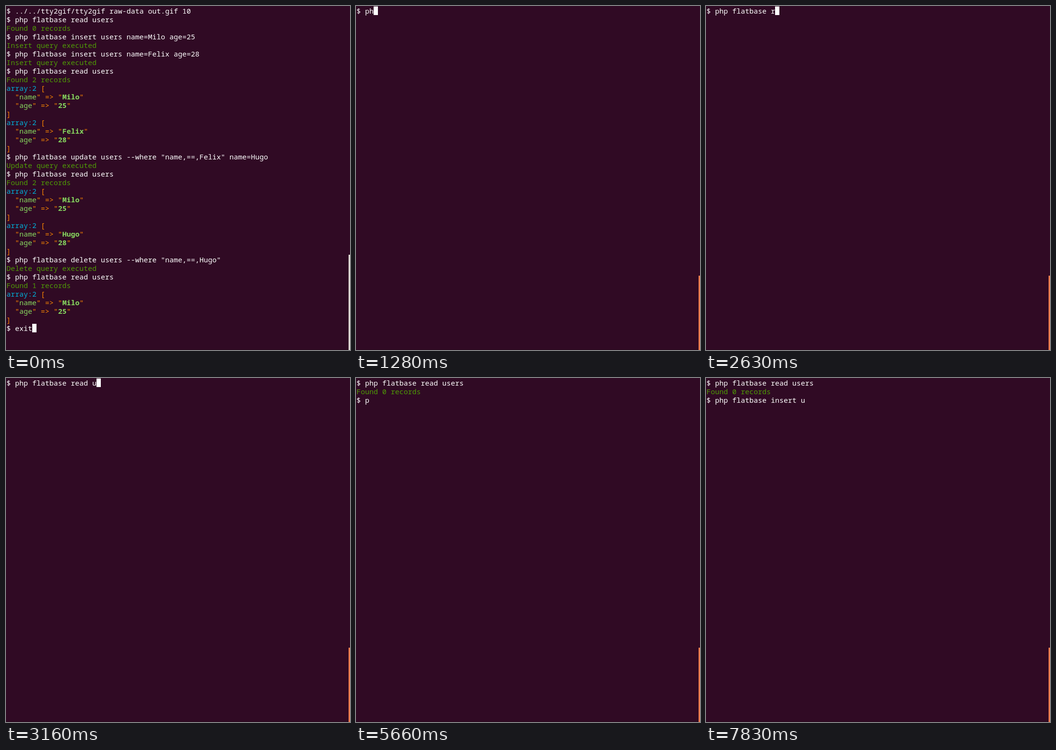
Write an HTML page that moves like this. It is 722 px wide and 722 px high and loops after 8 s.

```html
<!DOCTYPE html>
<html lang="en">
<head>
<meta charset="utf-8">
<title>Terminal session</title>
<style>
  html, body { margin: 0; width: 100%; height: 100%; overflow: hidden; background: #300a24; }
  #stage { position: relative; width: 722px; height: 722px; overflow: hidden; }
  #stage::after {
    content: ""; position: absolute; left: 0; bottom: 0; width: 722px; height: 1px; background: #280a1e;
  }
  #screen {
    position: absolute; left: 1px; top: 1px; margin: 0; color: #fff;
    font: 500 15px/18px "Noto Sans Mono", "Liberation Mono", monospace;
    font-variant-ligatures: none;
  }
  #cursor { position: absolute; width: 9px; height: 18px; background: #fff; }
  #scrollbar { position: absolute; left: 719px; width: 3px; bottom: 0; z-index: 1; }
  .ok { color: #4e9a06; }
  .type { color: #00afd7; }
  .mark { color: #ff8700; }
  .str { color: #87d75f; }
  b { font-weight: 700; }
</style>
</head>
<body>
<div id="stage">
  <pre id="screen"></pre>
  <div id="cursor"></div>
  <div id="scrollbar"></div>
</div>
<script>
const LOOP = 8000, CELL_W = 9, CELL_H = 18;
const CLEARED = 100, CURSOR_OFF = 3560, FOUND = 3900, PROMPT = 3970;
const [screenEl, cursorEl, barEl] = ["screen", "cursor", "scrollbar"].map(id => document.getElementById(id));

const span = (cls, text) => `<span class="${cls}">${text}</span>`;
const ok = text => span("ok", text);
const quoted = text => span("mark", '"') + span("str", text) + span("mark", '"');
const field = (key, value) => `  ${quoted(key)} ${span("mark", "=&gt;")} ${quoted(`<b>${value}</b>`)}`;
const record = (name, age) => [
  span("type", "array:2") + " " + span("mark", "["),
  field("name", name),
  field("age", age),
  span("mark", "]")
];

const run = command => "$ php flatbase " + command;
const found = count => ok(`Found ${count} records`);
const executed = query => ok(query + " query executed");
const read = (...records) => [run("read users"), found(records.length), ...records.flat()];

const adult = record("Milo", 25);
const history = [
  "$ ../../tty2gif/tty2gif raw-data out.gif 10",
  ...read(),
  run("insert users name=Milo age=25"), executed("Insert"),
  run("insert users name=Felix age=28"), executed("Insert"),
  ...read(adult, record("Felix", 28)),
  run('update users --where "name,==,Felix" name=Hugo'), executed("Update"),
  ...read(adult, record("Hugo", 28)),
  run('delete users --where "name,==,Hugo"'), executed("Delete"),
  ...read(adult),
  "$ exit"
];

// A burst of typing: chunks split by | appear one after another at a steady pace
const burst = (start, gap, keys) => t =>
  keys.split("|").filter((_, i) => t >= start + i * gap).join("");
const line = (...bursts) => t => "$ " + bursts.map(textAt => textAt(t)).join("");

const readLine = line(
  burst(1280, 230, "ph|p f|l"),
  burst(1855, 100, "a|t|b|a|s"),
  burst(2530, 90, "e |r|e|a"),
  burst(2960, 200, "d| u"),
  burst(3260, 290, "se|r|s")
);
const insertLine = line(
  burst(5660, 185, "p|hp| f|la"),
  burst(6530, 140, "tb|ase"),
  burst(7090, 245, " in|se|rt| u")
);

function linesAt(t) {
  if (t < CLEARED) return history;
  const lines = [readLine(t)];
  if (t >= FOUND) lines.push(found(0));
  if (t >= PROMPT) lines.push(insertLine(t));
  return lines;
}

let shown = null;
function draw(t) {
  const lines = linesAt(t);
  const html = lines.join("\n");
  if (html !== shown) screenEl.innerHTML = shown = html;

  cursorEl.hidden = t >= CURSOR_OFF;
  cursorEl.style.left = 1 + lines.at(-1).length * CELL_W + "px";
  cursorEl.style.top = 1 + (lines.length - 1) * CELL_H + "px";

  const full = t < CLEARED;
  barEl.style.top = (full ? 522 : 566) + "px";
  barEl.style.background = full ? "#dfd9d5" : "#ec7c4e";
}

const start = performance.now();
function tick() {
  draw((performance.now() - start) % LOOP);
  requestAnimationFrame(tick);
}
tick();
</script>
</body>
</html>
```
